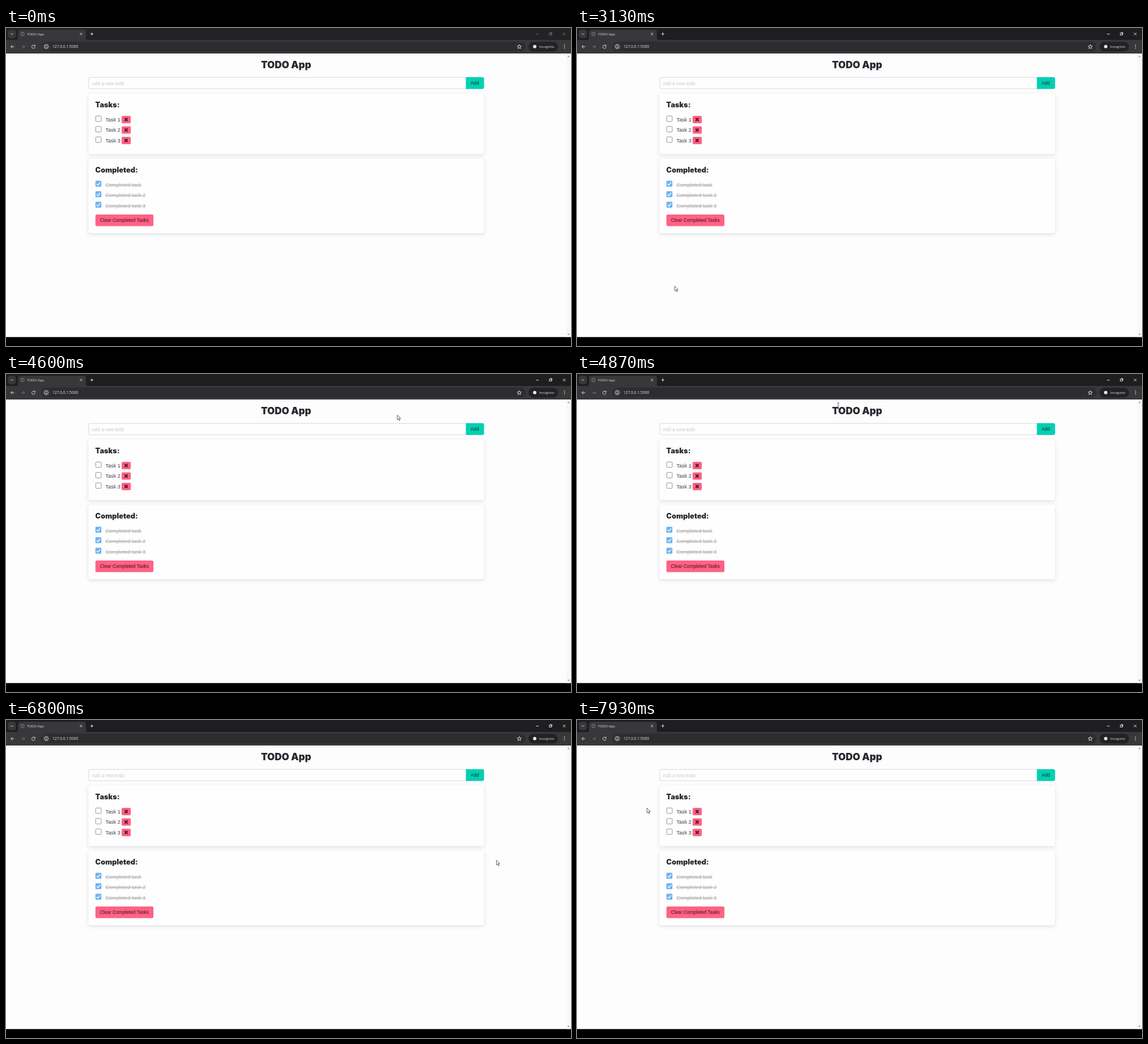
Animation of 997 by 561 pixels, one loop 8 s. Source, as an HTML page:

```html
<!DOCTYPE html>
<html lang="en">
<head>
<meta charset="utf-8">
<title>TODO App</title>
<style>
  html, body { margin: 0; width: 100%; height: 100%; overflow: hidden; background: #000; }
  svg { display: block; width: 100%; height: 100%; }
  text { font: 9.1px "Liberation Sans", Arial, sans-serif; fill: #3c3f46; }
  .chrome text { font: 6.1px "Open Sans", sans-serif; fill: #e8e8ea; }
  .chrome .url { font-size: 6.7px; }
  .icon { fill: none; stroke: #dcdcde; stroke-width: 1; }
  .heading { font: 900 12.8px Inter, sans-serif; fill: #25292f; }
  .title { font-size: 17px; text-anchor: middle; }
  .label { font-size: 8.35px; }
  .done { fill: #a5a5a8; text-decoration: line-through; }
  .card { fill: #fefefe; filter: drop-shadow(0 2px 3px rgba(20, 20, 70, .13)); }
</style>
</head>
<body>
<svg viewBox="0 0 997 561">
  <rect y="45" width="997" height="500.5" fill="#fdfdfd"/>

  <g class="chrome">
    <rect id="strip" width="997" height="22"/>
    <rect y="21" width="997" height="24" fill="#38373a"/>
    <rect x="3" y="3" width="14.5" height="15" rx="4.5" fill="#38373a"/>
    <path class="icon" d="M8.2 9.6l2.2 2.2 2.2-2.2"/>
    <path fill="#38373a" d="M17 21.5q4 0 4-4V7.500q0-4.500 4.500-4.500h111q4.500 0 4.500 4.500v10q0 4 4 4z"/>
    <circle cx="29" cy="10.500" r="3.300" fill="none" stroke="#77777b"/>
    <path d="M27 9l2 1.500-.5 2.500M30 8l1 2" fill="none" stroke="#77777b"/>
    <text x="37" y="12.800">TODO App</text>
    <path class="icon" d="M130.500 8.500l4 4m0-4l-4 4M148.800 10.500h5.400m-2.700-2.700v5.400"/>
    <g id="controls" class="icon">
      <path d="M935 10.800h5M982.700 8.200l4.600 4.600m0-4.600l-4.600 4.600M960 8.800v-.8h3.300v3.300h-.8"/>
      <rect x="958.800" y="9" width="3.500" height="3.500"/>
    </g>

    <path class="icon" d="M14.500 33H8.700m2.600-2.700L8.600 33l2.700 2.700"/>
    <path class="icon" opacity=".35" d="M27 33h5.800m-2.600-2.700l2.700 2.700-2.700 2.700"/>
    <path class="icon" d="M50.700 31.200a2.900 2.900 0 1 0 .6 2.400M51.300 29.800v2.100h-2.100"/>
    <rect x="62" y="24" width="855" height="17.500" rx="8.750" fill="#2d2c2f"/>
    <circle cx="71" cy="32.800" r="7" fill="#39383b"/>
    <circle class="icon" cx="71" cy="32.800" r="3.400"/>
    <path class="icon" d="M71 32.300v2.500M71 30.600v.9"/>
    <text class="url" x="82" y="35.200">127.0.0.1:5000</text>
    <path class="icon" stroke-width=".8" d="M905.700 29.200l1 2.500 2.700.2-2 1.800.6 2.600-2.300-1.400-2.300 1.400.6-2.600-2-1.800 2.700-.2z"/>
    <rect x="922" y="24.500" width="52" height="17" rx="8.500" fill="#222124"/>
    <circle cx="933" cy="32.800" r="3" fill="#e8e8ea"/>
    <text x="941" y="35">Incognito</text>
    <path d="M985.500 29.300v1.400m0 1.400v1.400m0 1.400v1.400" stroke="#dcdcde" stroke-width="1.400"/>
  </g>

  <rect x="988.500" y="45" width="8.500" height="500.500" fill="#f8f8fc"/>
  <path d="M990.700 51.300h3.800l-1.900-2.500zM990.700 539.500h3.800l-1.900 2.500z" fill="#8b8b90"/>

  <text class="heading title" x="494.200" y="71.200">TODO App</text>
  <rect x="146" y="87.200" width="697" height="20" rx="2.500" fill="#fefefe" stroke="#d5d5e1"/>
  <text class="label" x="151" y="101" style="fill:#c9c9cd">Add a new todo</text>
  <path fill="#02cfb1" d="M811.500 86.800h29q3 0 3 3v14.800q0 3-3 3h-29z"/>
  <text class="label" x="819.800" y="99.800" style="fill:#0b3b38">Add</text>

  <rect class="card" x="145.500" y="115.500" width="698" height="107" rx="4"/>
  <text class="heading" x="157.600" y="140.300">Tasks:</text>
  <g id="tasks"></g>

  <rect class="card" x="145.500" y="230.500" width="698" height="131.500" rx="4"/>
  <text class="heading" x="157.600" y="255.300">Completed:</text>
  <g id="completed"></g>
  <rect x="157.800" y="329" width="102.300" height="20.500" rx="2.500" fill="#ff6285"/>
  <text class="label" x="165.800" y="342" style="fill:#42101c">Clear Completed Tasks</text>

  <g id="cursor">
    <path id="arrow" d="M.4.4v8.400l2-1.800 1.500 3.200 1.400-.7-1.500-3.100h2.600z" fill="#fff" stroke="#3c3b4a" stroke-width=".8"/>
    <path id="beam" d="M-1.500-5.200Q0-5.200 0-4.200V4.500Q0 5.500-1.500 5.500M1.500-5.200Q0-5.200 0-4.200M0 4.500Q0 5.500 1.500 5.500" fill="none" stroke="#444" stroke-width=".9"/>
  </g>
  <rect y="545.500" width="997" height="15.500"/>
</svg>
<script>
const byId = id => document.getElementById(id);
const ROW = 18.45;

const openTask = i => `<g transform="translate(0 ${i * ROW})">
  <rect x="158.300" y="155.200" width="9.700" height="9.700" rx="1.400" fill="#fff" stroke="#85858c" stroke-width=".9"/>
  <text x="175.500" y="165">Task ${i + 1}</text>
  <rect x="204" y="155" width="16.200" height="13" rx="2" fill="#ff6285"/>
  <path d="M209.300 158.800l5.400 5.400m0-5.400l-5.400 5.400" stroke="#5e1425" stroke-width="2.100"/></g>`;

const doneTask = i => `<g transform="translate(0 ${i * ROW})">
  <rect x="157.800" y="269.600" width="10.500" height="10.500" rx="1.400" fill="#70b3f2"/>
  <path d="M160 275l2.200 2.300 4-4.800" fill="none" stroke="#fff" stroke-width="1.400"/>
  <text class="done" x="175.500" y="279.800">Completed task${i ? ' ' + (i + 1) : ''}</text></g>`;

byId('tasks').innerHTML = [0, 1, 2].map(openTask).join('');
byId('completed').innerHTML = [0, 1, 2].map(doneTask).join('');

// Pointer path as [ms, x, y]: it enters from below, rests, then circles the page.
const entry = [[2070, 447, 535], [2270, 300, 485], [2530, 136, 440]];
const laps = [
  [3067, 136, 440], [3270, 260, 482], [3530, 560, 495], [3867, 945, 391], [3933, 961, 368],
  [4270, 905, 180], [4530, 745, 85], [4867, 461, 56], [5270, 165, 115], [5530, 47, 212],
  [5667, 48, 268], [5867, 155, 375], [6067, 352, 432], [6333, 640, 432], [6533, 812, 383],
  [6800, 865, 247], [7130, 780, 125], [7467, 490, 48], [7733, 260, 80], [7933, 123, 155]
];

// Cubic Hermite curve through unevenly timed points.
function along(path, t) {
  const last = path.length - 1;
  if (t <= path[0][0]) return path[0].slice(1);
  if (t >= path[last][0]) return path[last].slice(1);
  const i = path.findIndex(p => p[0] > t) - 1;
  const a = path[i], b = path[i + 1], span = b[0] - a[0], u = (t - a[0]) / span;
  const slope = (k, axis) => {
    const p = path[Math.max(0, k - 1)], q = path[Math.min(last, k + 1)];
    return (q[axis] - p[axis]) / (q[0] - p[0]) * span;
  };
  return [1, 2].map(axis =>
    a[axis] * (1 + 2 * u) * (1 - u) ** 2 + slope(i, axis) * u * (1 - u) ** 2 +
    b[axis] * u * u * (3 - 2 * u) + slope(i + 1, axis) * u * u * (u - 1));
}

const textAreas = [[448, 54, 541, 77], [158, 129, 203, 143], [158, 244, 236, 258]];
const overText = (x, y) => textAreas.some(([l, t, r, b]) => x >= l && x <= r && y >= t && y <= b);
const show = (id, visible) => byId(id).setAttribute('visibility', visible ? 'visible' : 'hidden');

function draw(now) {
  const elapsed = now % 8000;
  const t = Math.floor((elapsed + 4) * 0.015) / 0.015;
  const focused = elapsed >= 1670;
  byId('strip').setAttribute('fill', focused ? '#1d1e1f' : '#232325');
  byId('controls').setAttribute('opacity', focused ? 1 : 0.4);

  const [x, y] = along(t < 3067 ? entry : laps, t);
  const present = elapsed >= 2070, beam = overText(x, y);
  byId('cursor').setAttribute('transform', `translate(${Math.round(x)} ${Math.round(y)})`);
  show('arrow', present && !beam);
  show('beam', present && beam);
}

const start = performance.now();
function tick() {
  draw(performance.now() - start);
  requestAnimationFrame(tick);
}
tick();
</script>
</body>
</html>
```
